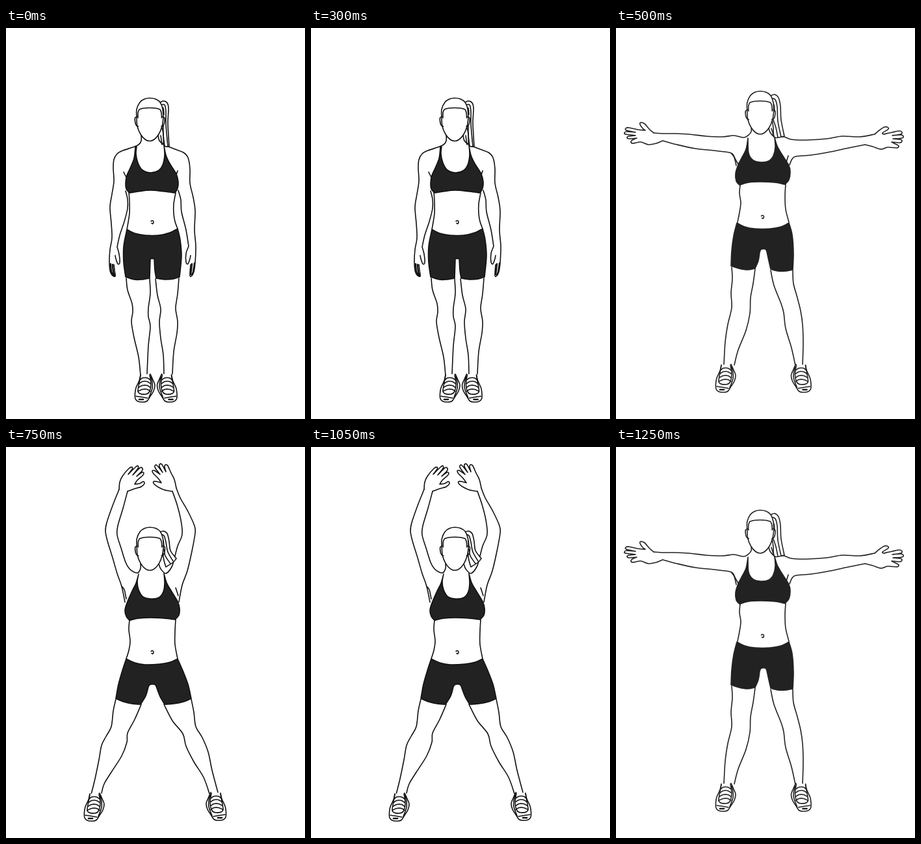
These frames come from a looping animation (460 by 600 pixels, 1500 ms). An HTML page:

```html
<!DOCTYPE html>
<html lang="en">
<head>
<meta charset="utf-8">
<title>Jumping jack</title>
<style>
  html, body { margin: 0; width: 100%; height: 100%; overflow: hidden; background: #fff; }
  svg { display: block; width: 460px; height: 600px; }
  .pose { opacity: 0; stroke-width: 1.6; stroke-linecap: round; stroke-linejoin: round; }
</style>
</head>
<body>
<svg id="stage" viewBox="0 0 460 600"></svg>
<script>
const INK = '#222';
const LOOP = 1500;

// Smooth curve through points; "/" makes a corner, "|" starts a new line.
function smooth(text) {
  return text.split('|').map(line => {
    let last = null, d = '';
    for (const part of line.split('/')) {
      const pts = part.trim().split(/\s+/).map(p => p.split(',').map(Number));
      if (last) pts.unshift(last);
      else d = 'M' + pts[0];
      for (let i = 0; i < pts.length - 1; i++) {
        const b = pts[i], c = pts[i + 1];
        const a = pts[i - 1] || b, e = pts[i + 2] || c;
        const c1 = b.map((v, k) => (v + (c[k] - a[k]) / 6).toFixed(2));
        const c2 = c.map((v, k) => (v - (e[k] - b[k]) / 6).toFixed(2));
        d += `C${c1} ${c2} ${c}`;
      }
      last = pts[pts.length - 1];
    }
    return d;
  }).join('');
}

const path = (text, fill = 'none', extra = '') =>
  `<path d="${smooth(text)}" fill="${fill}" ${extra}/>`;
const move = (x, y, body) => `<g transform="translate(${x} ${y})">${body}</g>`;

const head =
  path('201,138 201,125 206,114 213,109 221,107.5 230,109 237,114 241,124 242,138 / 240,151 235,163 228,171 221,173.5 214,171 207,163 202,151 201,138', '#fff') +
  path('203,138 203,130 205,125 / 212,123 221,122.5 230,123 237,125 / 239,130 239.5,138') +
  path('201.5,136 198.5,138 199,146 201,150 203.5,151 | 240.5,136 244,138 243.5,146 241.5,150 239,151');

const laces = [538, 543.5, 549.5, 555.5]
  .map((y, i) => `${206 - i},${y + 2} 210,${y - 1} 217,${y - 1} 222,${y + 2}`).join(' | ');
const shoe =
  path('207,532 205,541 200,552 198.5,561 199,569 203,573 210,574 217,572.5 222,565 227,557 229,548 226,540 222,531', '#fff') +
  path(laces) +
  path('207,533 205,544 203,557 206,561 214,562 220,559 223,547 221,532 | 223,535 225,544 225,553 220,567 | 200,565 207,566 218,568') +
  path('205,570 211,570', 'none', 'stroke-width="2.6"');
const mirroredShoe = `<g transform="translate(461.5 0) scale(-1 1)">${shoe}</g>`;

const navel = path('223,296.5 225.5,295.5 227,298 225.5,300.5 224,299.5');

const closed = {
  ink: '#111',
  headAt: [0, 0],
  navelAt: [0, 0],
  shoes: [[0, 0], [0, 0]],
  arms: [
    '208,162 208,173 204,179 195,183 180,188 171,193 166,202 165,215 166,235 163,255 160,275 162,300 163,322 160,340 159,357 160,372 163,379 168,381 167,372 166,363',
    '184,250 187,263 187,277 182,297 175,318 171,336 / 174,347 175,360 172,362 169,354 168,349',
    '234,164 236,173 243,179 260,186 273,191 280,199 283,216 283,238 288,260 291,280 290,310 292,335 291,360 289,374 285,381 283,379 284,363',
    '265,249 269,264 270,282 277,310 281,335 / 277,346 277,359 280,362 283,354 284,349',
    '181,221 186,231 | 264,219 261,229'
  ],
  fingers: '161,362 162,374 165,379 | 164,363 165,374 167,380 | 290,361 288,374 286,379 | 286,362 285,371 284,378',
  torso: '189,252 190,267 190,284 188,298 186,309 | 261,253 258,270 258,285 260,297 264,308',
  top: '199,182 197,200 191,215 186,226 184,238 185,247 190,253 / 203,251 222,249 244,251 260,253 / 264,246 265,236 262,224 252,208 246,195 243,180 / 244,195 241,210 234,219 222,222 210,218 203,207 200,193 201,182 / 199,182',
  shorts: '186,309 / 198,315 214,318 235,318 252,314 264,308 / 268,325 270,350 267,382 / 258,385 245,386 231,384 / 229,372 228,354 / 222,354 / 221,384 / 209,386 197,386 184,382 / 181,360 181,335 186,309',
  legs: '185,384 187,402 194,423 195,436 193,451 197,475 204,505 207,533 | 221,385 222,407 219,430 219,443 222,458 219,488 217,531 | 230,385 233,410 238,431 236,451 238,476 242,502 243,531 | 266,384 264,408 261,430 264,450 263,468 258,497 256,531',
  hair: '236,115 242,112 248,115 250,123 249,145 250,165 251,182 / 243,180 242,162 239,150 / 238,118',
  strands: '238,118 244,118 246,128 246,148 249,182 | 239,123 242,123 243,133 | 238,165 240,179 | 242,150 242,164 244,181'
};

const wide = {
  ink: INK,
  headAt: [0.8, -10.5],
  navelAt: [0.5, -8],
  shoes: [[-45, -15], [37, -15]],
  arms: [
    '208,151 208,159 203,165 196,168 181,165 164,167 138,166 112,163 90,162 73,162 58,161',
    '58,161 52,156 44,147 38,145 37,148 41,154 45,157 / 34,156 20,153 15,154 16,157 30,160 / 16,159 13,161 15,163 30,165 / 20,166 17,168 20,170 32,169 / 25,172 23,175 26,177 38,175 50,179 62,177 72,173 / 94,179 122,185 150,188 174,191 180,194 184,202 188,209',
    '235,153 237,160 244,167 258,167 270,171 292,172 324,170 348,166 375,167 398,163',
    '398,163 405,157 413,152 419,153 418,156 410,161 412,163 / 425,160 436,158 440,160 438,163 425,165 / 438,164 442,166 440,169 426,170 / 437,171 440,173 437,176 424,175 / 432,179 435,181 432,184 418,183 408,186 395,182 383,179 / 358,184 325,191 300,195 277,197 271,201 267,210',
    '178,193 182,199 185,211 | 265,196 262,206'
  ],
  torso: '191,241 190,254 192,268 190,283 187,298 | 261,240 260,258 261,278 266,298',
  top: '203,169 200,186 193,200 188,210 184,223 185,235 190,241 / 204,237 222,236 244,237 260,240 / 266,233 268,221 266,211 256,195 248,181 244,168 / 245,183 242,196 235,204 223,206 211,203 204,192 203,169',
  shorts: '186,299 / 198,305 214,308 237,308 254,305 266,299 / 271,317 273,345 272,371 / 261,373 249,373 238,370 / 235,357 232,343 / 230,339.5 227,339 223,340 221,344 / 219,357 214,369 / 202,371 189,369 177,365 / 178,342 181,319 186,299',
  legs: '178,367 179,385 177,407 178,429 172,455 168,482 166,517 | 214,370 211,392 207,414 206,438 200,464 188,494 182,517 | 238,372 243,395 254,423 258,437 261,461 270,491 276,518 | 272,372 273,392 279,414 284,434 287,455 288,483 287,518',
  hair: '238,104 244,102 250,107 253,120 254,141 259,166 / 244,168 242,153 240,139 / 239,108',
  strands: '240,108 245,110 248,121 249,143 254,167 | 240,113 243,118 244,128 | 242,141 246,153 249,168 | 239,154 243,167'
};

const raised = {
  ink: '#111',
  headAt: [0.3, 15.8],
  navelAt: [0, 17],
  shoes: [[-78, 0], [75.5, -1]],
  arms: [
    '207,178 207,186 203,193 197,192 190,187 184,177 177,155 171,135 172,121 180,94 187,68',
    '183,238 178,214 171,194 164,170 156,144 153,129 155,116 164,90 174,65',
    '174,65 175,54 179,45 189,33 194,31 194,34 188,42 / 199,31 203,29 203,33 195,43 / 206,32 210,33 209,37 201,45 / 209,39 212,40 210,44 202,51 198,57 / 206,56 211,53 213,56 208,61 198,64 187,68',
    '235,179 238,187 246,194 255,184 259,171 264,152 271,134 269,112 263,88 256,68',
    '266,238 271,212 279,190 286,160 291,132 290,121 280,99 268,78 262,63',
    '262,63 259,50 254,40 249,29 246,27 244,30 246,38 / 240,27 237,26 236,30 241,39 / 232,28 229,29 230,33 237,42 / 228,36 225,37 227,41 234,48 239,55 / 232,53 227,53 228,57 235,62 244,66 256,68',
    '178,214 182,219 185,233 | 261,216 265,228'
  ],
  torso: '190,266 189,280 191,298 189,312 185,325 | 261,265 260,283 260,303 264,325',
  top: '204,195 200,209 194,221 187,237 183,250 185,260 190,266 / 204,263 222,262 244,263 260,265 / 266,258 267,247 264,237 255,222 247,208 243,194 / 244,209 242,222 235,231 223,233 211,230 204,219 202,207 204,195',
  shorts: '185,325 / 198,331 214,334 237,333 253,330 264,325 / 272,343 280,364 285,386 / 273,391 258,394 244,395 / 237,383 231,367 / 229,364.5 225,364 221,365 219,368 / 215,382 207,395 / 194,394 181,391 169,386 / 173,364 179,343 185,325',
  legs: '169,387 165,405 162,429 154,444 147,458 143,480 137,509 131,533 | 208,395 198,418 187,439 186,453 178,474 162,499 151,517 147,531 | 243,395 256,420 272,440 277,459 289,483 304,507 313,532 | 285,387 289,407 292,429 302,446 311,468 317,496 326,530',
  hair: '236,131 242,129 248,133 251,145 253,159 262,171 / 257,177 246,184 / 243,174 241,161 / 238,134',
  strands: '238,134 243,136 246,146 249,161 257,175 | 239,140 242,144 243,153 | 243,157 245,167 253,179'
};

function draw(p) {
  const [left, right] = p.shoes;
  return p.arms.map(a => path(a)).join('') +
    path(p.torso) + path(p.legs) +
    path(p.hair, '#fff') + path(p.strands) +
    path(p.top, INK) + path(p.shorts, INK) +
    (p.fingers ? path(p.fingers, 'none', 'stroke-width="2.4"') : '') +
    move(...p.navelAt, navel) + move(...p.headAt, head) +
    move(...left, shoe) + move(...right, mirroredShoe);
}

const steps = [
  [0, closed],
  [500, wide],
  [750, raised],
  [1250, wide],
  [LOOP, closed]
];

const stage = document.getElementById('stage');
for (const pose of [closed, wide, raised]) {
  const group = document.createElementNS('http://www.w3.org/2000/svg', 'g');
  group.setAttribute('class', 'pose');
  group.setAttribute('stroke', pose.ink);
  group.innerHTML = draw(pose);
  stage.append(group);
  group.animate(
    steps.map(([at, shown]) => ({
      offset: at / LOOP,
      opacity: shown === pose ? 1 : 0,
      easing: 'steps(1, end)'
    })),
    { duration: LOOP, iterations: Infinity }
  );
}
</script>
</body>
</html>
```
